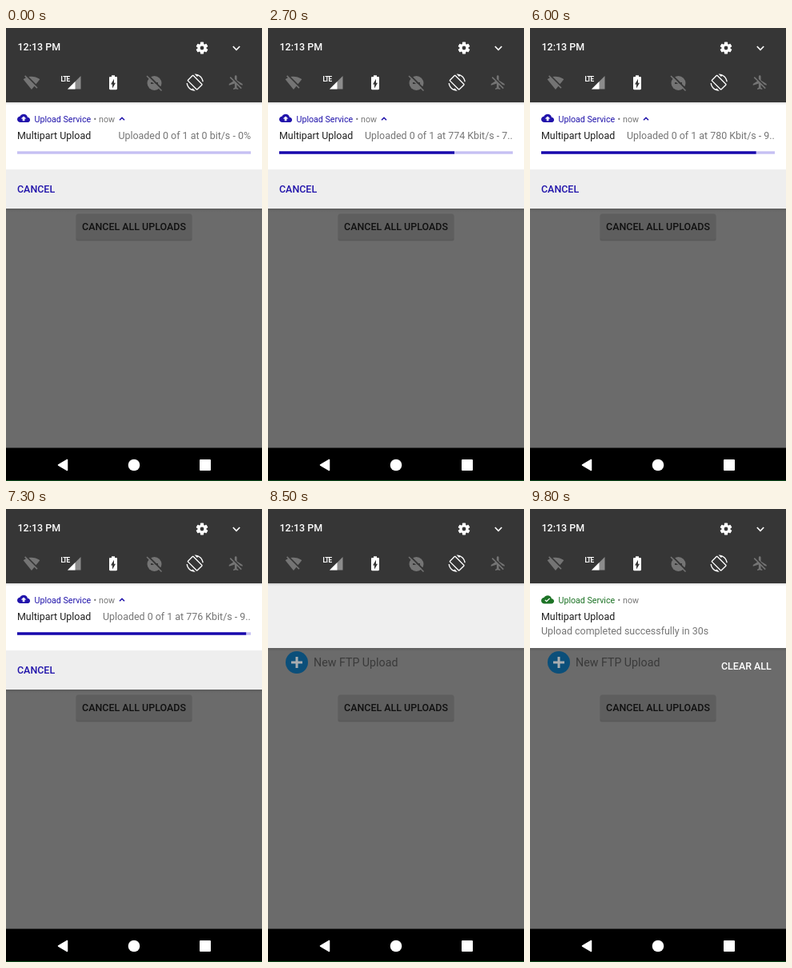
Animation of 320x567 px, one loop 9900 ms. Source, as an HTML page:

```html
<!DOCTYPE html>
<html lang="en">
<head>
<meta charset="utf-8">
<title>Upload notification</title>
<style>
html, body { margin: 0; width: 100%; height: 100%; overflow: hidden; background: #000; }
svg { display: block; width: 100%; height: 100%; }
text { font-family: Roboto, Arial, sans-serif; font-size: 12.44px; white-space: pre; }
.small { font-size: 10.67px; }
.med { font-weight: 500; }
.blue { fill: #2114ab; }
.green { fill: #1d7326; }
.gray { fill: #757575; }
.dark { fill: #1e1e1e; }
.off { fill: #747474; }
.line { fill: none; stroke-width: 1.6; }
</style>
</head>
<body>
<svg viewBox="0 0 320 567" preserveAspectRatio="none">
  <defs>
    <linearGradient id="shade" x2="0" y2="1">
      <stop offset="0" stop-opacity=".14"/><stop offset="1" stop-opacity="0"/>
    </linearGradient>
    <clipPath id="oldClip"><rect id="oldBox" y="93"/></clipPath>
    <clipPath id="newClip"><rect id="newBox" y="93"/></clipPath>
    <path id="cloud" d="M19.35 10.04C18.67 6.59 15.64 4 12 4 9.11 4 6.6 5.64 5.35 8.04 2.34 8.36 0 10.91 0 14c0 3.31 2.69 6 6 6h13c2.76 0 5-2.24 5-5 0-2.64-2.05-4.78-4.65-4.96z"/>
    <rect id="tooth" x="-2.1" y="-7.4" width="4.2" height="4" rx=".6"/>
  </defs>

  <!-- dimmed app -->
  <rect width="320" height="567" fill="#6b6b6b"/>
  <circle cx="36" cy="192" r="14" fill="#0b4f7a"/>
  <path d="M36 185v14M29 192h14" stroke="#a9adb0" stroke-width="3"/>
  <text x="57" y="197" fill="#3a3a3a" style="font-size:14.22px">New FTP Upload</text>
  <rect x="87.5" y="233.5" width="145" height="33" rx="2" fill="#000" opacity=".16"/>
  <rect x="88" y="232.5" width="144" height="32" rx="2" fill="#5e5e5e"/>
  <text class="med" x="160" y="253" text-anchor="middle" fill="#101010">CANCEL ALL UPLOADS</text>
  <text class="med" id="clear" x="239" y="200.5" fill="#fff">CLEAR ALL</text>

  <!-- notification panel -->
  <rect id="shadow" width="320" height="4" fill="url(#shade)"/>
  <rect id="panel" y="93" width="320" fill="#efefef"/>

  <g id="old" clip-path="url(#oldClip)">
    <rect y="93" width="320" height="140" fill="#fff"/>
    <g id="oldBody">
      <g transform="translate(14 105.3) scale(.67 .64)">
        <use href="#cloud" class="blue"/><path d="M14 13v4h-4v-4H7l5-5 5 5h-3z" fill="#fff"/>
      </g>
      <text class="small blue" x="35.5" y="117.5">Upload Service</text>
      <text class="small gray" x="109.5" y="117.5">•</text>
      <text class="small gray" x="116" y="117.5">now</text>
      <path id="arrow" class="line" stroke="#2114ab"/>
      <text class="dark" x="14" y="139.3">Multipart Upload</text>
      <text class="gray" id="info" y="139.3"></text>
      <g id="track">
        <rect x="14" y="154.3" width="292" height="3.4" fill="#c6c0f3"/>
        <rect id="bar" x="14" y="154.3" height="3.4" fill="#1808ac"/>
      </g>
    </g>
    <g id="action">
      <rect y="177" width="320" height="49" fill="#eeeeee"/>
      <text class="med blue" x="14" y="206.3">CANCEL</text>
    </g>
  </g>

  <g id="done">
    <rect id="edge" y="93" fill="none" stroke="#000" stroke-opacity=".25" stroke-width="1.5"/>
    <g clip-path="url(#newClip)">
      <rect y="93" width="320" height="81" fill="#fff"/>
      <g id="newBody">
        <g transform="translate(14 103.3) scale(.67 .64)">
          <use href="#cloud" class="green"/>
          <path d="M10 17l-3.5-3.5 1.41-1.41L10 14.17 15.18 9l1.41 1.41L10 17z" fill="#fff"/>
        </g>
        <text class="small green" x="35.5" y="115.2">Upload Service</text>
        <text class="small gray" x="109.5" y="115.2">•</text>
        <text class="small gray" x="116" y="115.2">now</text>
        <text class="dark" x="14" y="136.6">Multipart Upload</text>
        <text class="gray" x="14" y="154.6">Upload completed successfully in 30s</text>
      </g>
    </g>
  </g>

  <!-- quick settings -->
  <rect y="93" width="320" height="3" fill="url(#shade)"/>
  <rect width="320" height="93" fill="#363636"/>
  <text x="14.5" y="27.5" class="med" fill="#fff">12:13 PM</text>
  <g id="gear" transform="translate(245 25)" fill="#fff">
    <circle r="4" fill="none" stroke="#fff" stroke-width="3.2"/>
  </g>
  <path class="line" d="M283.8 23l4.2 4.3 4.2-4.3" stroke="#fff"/>
  <path class="off" transform="translate(21.3 58) scale(.889)" d="M23.64 7c-.45-.34-4.93-4-11.64-4-1.5 0-2.89.19-4.15.48L18.18 13.8 23.64 7zm-6.6 8.22L3.27 1.44 2 2.72l2.05 2.06C1.91 5.76.59 6.82.36 7l11.63 14.49.01.01.01-.01 3.9-4.86 3.32 3.32 1.27-1.27-3.46-3.46z"/>
  <path d="M93.5 60v16.5H77z" fill="#8c8c8c"/>
  <path d="M86.5 67v9.5H77z" fill="#fff"/>
  <rect x="67" y="58" width="14.5" height="10.5" fill="#363636"/>
  <text x="68.5" y="67" fill="#fff" style="font-size:8.2px;font-weight:700;letter-spacing:-.9px">LTE</text>
  <path fill="#fff" fill-rule="evenodd" transform="translate(122 57.5) scale(1 .9)" d="M15.67 4H14V2h-4v2H8.33C7.6 4 7 4.6 7 5.33v15.33C7 21.4 7.6 22 8.33 22h7.33c.74 0 1.34-.6 1.34-1.33V5.33C17 4.6 16.4 4 15.67 4zM11 20v-5.5H9L13 7v5.5h2L11 20z"/>
  <circle class="off" cx="185.5" cy="69" r="9"/>
  <path d="M181 69h9" stroke="#363636" stroke-width="2"/>
  <path d="M177.5 59l18 18" stroke="#363636" stroke-width="2"/>
  <path d="M176 60l18.5 18.5" stroke="#747474" stroke-width="1.6"/>
  <path fill="#fff" transform="translate(225.5 57.5) scale(.889)" d="M16.48 2.52c3.27 1.55 5.61 4.72 5.97 8.48h1.5C23.44 4.84 18.29 0 12 0l-.66.03 3.81 3.81 1.33-1.32zm-6.25-.77c-.59-.59-1.54-.59-2.12 0L1.75 8.11c-.59.59-.59 1.54 0 2.12l12.02 12.02c.59.59 1.54.59 2.12 0l6.36-6.36c.59-.59.59-1.54 0-2.12L10.23 1.75zm4.6 19.44L2.81 9.17l6.36-6.36 12.02 12.02-6.36 6.36zm-7.31.29C4.25 19.94 1.91 16.76 1.55 13H.05C.56 19.16 5.71 24 12 24l.66-.03-3.81-3.81-1.33 1.32z"/>
  <path class="off" transform="translate(277 57.5) scale(.889)" d="M13 9V3.5c0-.83-.67-1.5-1.5-1.5S10 2.67 10 3.5v3.68l7.83 7.83L21 16v-2l-8-5zM3 5.27l4.99 4.99L2 14v2l8-2.5V19l-2 1.5V22l3.5-1 3.5 1v-1.5L13 19v-3.73L18.73 21 20 19.73 4.27 4 3 5.27z"/>

  <!-- navigation bar -->
  <rect y="525.5" width="320" height="41.5" fill="#000"/>
  <rect y="566" width="320" height="1" fill="#0b4a1a"/>
  <path d="M65.5 547l11-6.5v13z" fill="#fff" stroke="#fff" stroke-width="1.5" stroke-linejoin="round"/>
  <circle cx="160" cy="547" r="7.3" fill="#fff"/>
  <rect x="242" y="540" width="14" height="14" rx="1" fill="#fff"/>
</svg>
<script>
const LOOP = 9900, STEP = 100;
// start time, percent, Kbit/s
const uploads = [
  [0, 0, 0], [600, 12, 752], [1000, 26, 760], [1300, 38, 764], [1700, 51, 768],
  [2100, 62, 772], [2500, 75, 774], [4300, 80.5, 792], [5200, 86, 786],
  [5700, 92, 780], [6500, 98, 776]
];
const $ = id => document.getElementById(id);
const set = (id, attrs) => {
  for (const k in attrs) $(id).setAttribute(k, attrs[k]);
};
const ramp = (t, from, to) => Math.min(1, Math.max(0, (t - from) / (to - from)));
const shiftY = y => `translate(0 ${y})`;

for (let a = 0; a < 360; a += 60) {
  const tooth = document.createElementNS("http://www.w3.org/2000/svg", "use");
  tooth.setAttribute("href", "#tooth");
  tooth.setAttribute("transform", `rotate(${a})`);
  $("gear").append(tooth);
}

function box(id, inset, bottom) {
  set(id, { x: inset, width: 320 - 2 * inset, height: bottom - 93 });
}

function showUpload(t) {
  const [, percent, speed] = uploads.filter(u => u[0] <= t).pop();
  set("bar", { width: 2.92 * percent });
  set("info", speed ? { x: 121, "text-anchor": "start" } : { x: 306, "text-anchor": "end" });
  const rate = speed ? `${speed} Kbit/s - ${String(percent)[0]}..` : "0 bit/s - 0%";
  $("info").textContent = "Uploaded 0 of 1 at " + rate;
}

function draw(t) {
  const leave = ramp(t, 8100, 8500), enter = ramp(t, 8500, 8800);
  const bottom = 226 - 52 * Math.pow(leave, 2.4);
  showUpload(t);

  set("panel", { height: bottom - 93 });
  set("shadow", { y: bottom });
  box("oldBox", 54 * leave, bottom - (leave ? 16 : 0));
  set("old", { visibility: leave < 1 ? "visible" : "hidden" });
  set("oldBody", { opacity: 1 - 0.85 * leave, transform: shiftY(-27.5 * leave) });
  set("track", { transform: shiftY(-3.5 * leave) });
  set("action", { visibility: leave ? "hidden" : "inherit" });
  set("arrow", { d: leave ? "M142 112l3 3 3-3" : "M142 115.3l3-3 3 3" });

  const inset = 54 * (1 - enter) ** 2, end = enter < 1 ? 171 : 174;
  box("newBox", inset, end);
  box("edge", inset, end);
  set("edge", { visibility: enter < 1 ? "visible" : "hidden" });
  set("newBody", { transform: shiftY(2.4 * ramp(t, 8700, 8900)) });
  set("done", { opacity: Math.min(1, enter * 1.5) });
  set("clear", { opacity: ramp(t, 8900, 9300) });
}

function tick(now) {
  draw(Math.floor((now % LOOP) / STEP) * STEP);
  requestAnimationFrame(tick);
}
draw(0);
requestAnimationFrame(tick);
</script>
</body>
</html>
```
